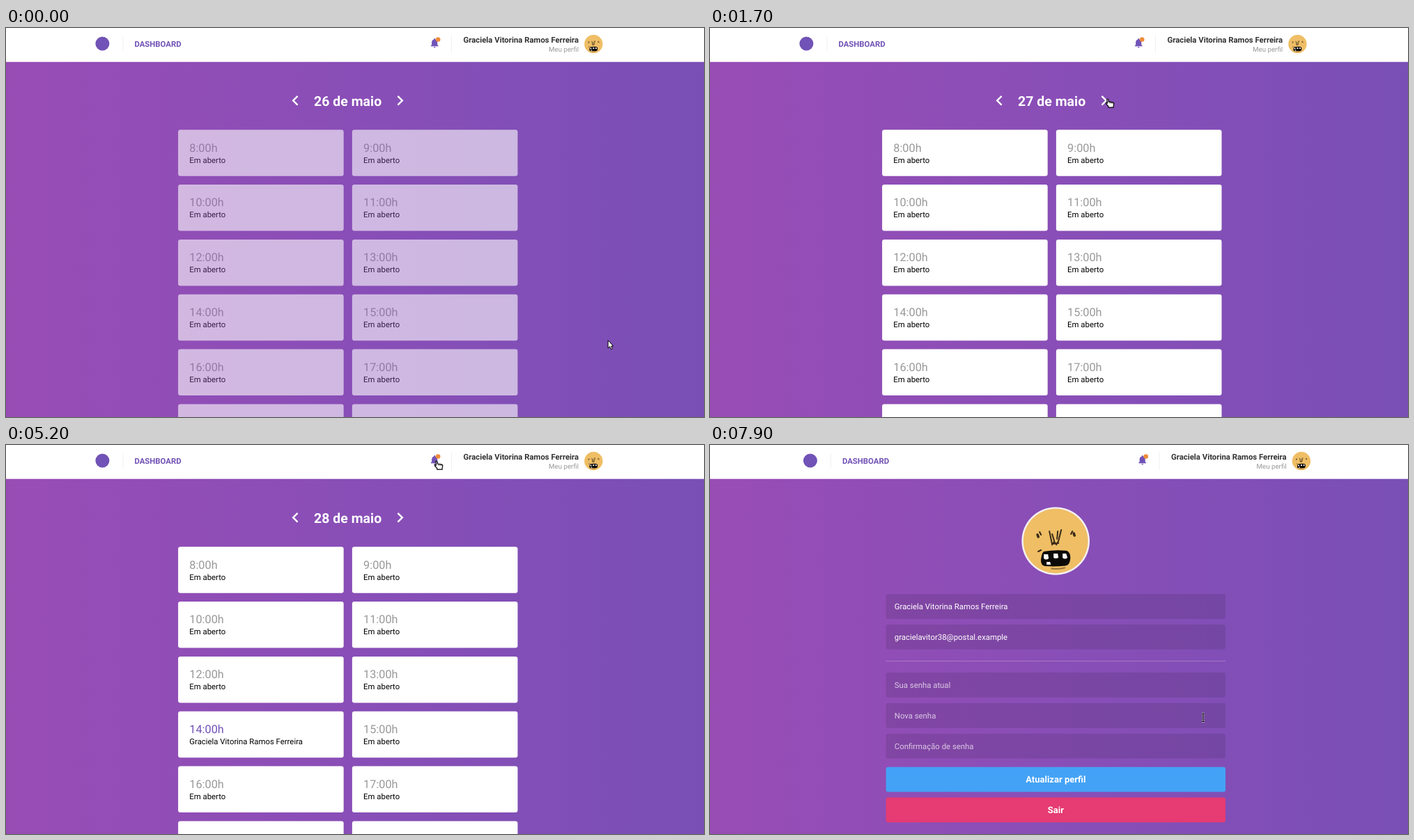
Recreate the animation shown at these times as an HTML page. Size 1002x559 px, loop 8000 ms.

```html
<!DOCTYPE html>
<html lang="pt-BR">
<head>
<meta charset="utf-8">
<title>Dashboard</title>
<style>
  html, body { margin: 0; width: 100%; height: 100%; overflow: hidden; }
  svg { display: block; width: 100%; height: 100%; }
  text { font-family: Roboto, Arial, sans-serif; text-rendering: geometricPrecision; white-space: pre; }
</style>
</head>
<body>
<svg id="stage" viewBox="0 0 1002 559"></svg>
<script>
const LOOP = 8000;
const STEP = 100;
const PX = 0.8125; // page zoom
const PURPLE = '#7152b6';
const NAME = 'Graciela Vitorina Ramos Ferreira';
const [FIRST, ...REST] = NAME.split(' ');

const text = (x, y, size, fill, str, extra = '') =>
  `<text x="${x}" y="${y}" font-size="${size * PX}" fill="${fill}" ${extra}>${str}</text>`;
const rect = (x, y, w, h, fill, r = 0, extra = '') =>
  `<rect x="${x}" y="${y}" width="${w}" height="${h}" rx="${r}" fill="${fill}" ${extra}/>`;
const circle = (x, y, r, fill) => `<circle cx="${x}" cy="${y}" r="${r}" fill="${fill}"/>`;
const icon = (x, y, size, fill, d) =>
  `<path transform="translate(${x} ${y}) scale(${size * PX / 24})" fill="${fill}" d="${d}"/>`;
const BOLD = 'font-weight="700"';
const END = 'text-anchor="end"';
const MIDDLE = 'text-anchor="middle"';

// Face centred on 0,0 with a radius of 46.4
function avatar(x, y, r) {
  return `<g transform="translate(${x} ${y}) scale(${r / 46.4})">
    ${circle(0, 0, 46.4, '#efbe65')}
    <g fill="none" stroke="#3a2b18" stroke-width="2" stroke-linecap="round">
      <path stroke-width="3.6" d="M-26 -9l1 3M26 -11l1 3"/>
      <path d="M-23 -13l2 4M24 -14l-2 4M-25 15l4 -2"/>
      <path d="M-9 -14l4 19 3 -4 3 4 3 -5 4 -16M-5 -10l3 10M3 -14l-1 11M-4 4l8 -1"/>
      <path stroke="#9a743c" d="M-6 39.5q9 1.500 19 -1"/>
    </g>
    <path fill="#0c0a08" d="M-17 15Q0 12 16 14Q22 17 21 26Q20 35 14 35.500Q0 37 -15 36Q-22 35 -21 26Q-20 17 -17 15Z"/>
    <path fill="#fff" d="M-17 19h6l1 6q-4 3 -7 0zM-3 18h6l1 6q-4 2 -7 0zM10 18h5l2 6q-4 3 -7 0zM-13 30l5 0 1 4h-6z"/>
  </g>`;
}

const BELL = 'M12 22c1.1 0 2-.9 2-2h-4c0 1.1.89 2 2 2zm6-6v-5c0-3.07-1.64-5.64-4.5-6.32V4c0-.83-.67-1.5-1.5-1.5s-1.5.67-1.5 1.5v.68C7.63 5.36 6 7.92 6 11v5l-2 2v1h16v-1l-2-2z';
const PREV = 'M15.41 7.41L14 6l-6 6 6 6 1.41-1.41L10.83 12z';
const NEXT = 'M10 6L8.59 7.41 13.17 12l-4.58 4.59L10 18l6-6z';

const header = () => `${rect(0, 0, 1002, 48.75, '#fff')}
  <g id="bar">
    ${circle(138.4, 22.5, 10, PURPLE)}
    ${rect(167.6, 12.5, 0.8, 20, '#eee')}
    ${text(184.4, 26.8, 14, PURPLE, 'DASHBOARD', BOLD)}
    ${icon(607.1, 13.4, 20, PURPLE, BELL)}
    ${circle(620.2, 16.5, 3.3, '#ee8a38')}
    ${rect(639.2, 10, 0.8, 26, '#eee')}
    ${text(822.2, 20.8, 14, '#333', NAME, BOLD + END)}
    ${text(822.2, 34.2, 12, '#999', 'Meu perfil', END)}
    ${avatar(843.4, 23, 13.2)}
  </g>`;

function slot(i) {
  const x = i % 2 ? 496.9 : 247.1;
  const y = 146.2 + Math.floor(i / 2) * 78.85;
  const hour = 8 + i;
  return rect(x, y, 237.6, 66.5, '#fff', 3.25) +
    text(x + 16.2, y + 31.3, 20, '#999', `${hour}:00h`, `id="time${hour}"`) +
    text(x + 16.2, y + 47.3, 14, '#000', 'Em aberto', `id="who${hour}"`);
}

const agenda = () => `<g id="agenda">
  ${icon(400.7, 89.6, 36, '#fff', PREV)}
  ${text(490.6, 112, 24, '#fff', '', `id="date" ${BOLD} ${MIDDLE}`)}
  ${icon(551.1, 89.6, 36, '#fff', NEXT)}
  <g id="slots">${Array.from({ length: 12 }, (_, i) => slot(i)).join('')}</g>
</g>`;

function notice(i) {
  const y = 83.4 + i * 95.7;
  const line = (dy, size, fill, str) => text(525.8, y + dy, size, fill, str);
  const opening = line(0, 13, '#fff', `Novo agendamento de ${FIRST}`);
  if (i === 2) return opening;
  return opening +
    line(14, 13, '#fff', `${REST.join(' ')} para dia 29`) +
    line(28, 13, '#fff', `de maio, às ${9 + i}:00h.`) +
    line(40.8, 12, 'rgba(255,255,255,.6)', 'há 19 minutos') +
    line(58, 12, '#b09ade', 'Marcar como lida') +
    circle(613.2, y + 54.6, 3.3, '#ff8450') +
    rect(525.8, y + 72.3, 178.5, 0.8, 'rgba(255,255,255,.12)');
}

const popup = () => `<g id="popup">
  <path fill="rgba(0,0,0,.6)" d="M598.8 56.800L615.1 40.600L631.300 56.800H717.300a3.25 3.25 0 0 1 3.25 3.25V289.100a3.25 3.25 0 0 1 -3.25 3.25H512.700a3.25 3.25 0 0 1 -3.25 -3.25V60.050a3.25 3.25 0 0 1 3.25 -3.25Z"/>
  ${[0, 1, 2].map(notice).join('')}
</g>`;

const field = (y, str, fill) =>
  rect(252.6, y, 487.4, 35.75, 'rgba(0,0,0,.1)', 3.25) + text(264.8, y + 22.1, 14, fill, str);
const button = (y, fill, str) =>
  rect(252.6, y, 487.4, 35.75, fill, 3.25) + text(496.3, y + 22.5, 16, '#fff', str, BOLD + MIDDLE);

function profile() {
  const hint = 'rgba(255,255,255,.7)';
  return `<g id="profile">
    ${circle(496.2, 138, 48.8, '#f4f1f5')}
    ${avatar(496.2, 138, 46.4)}
    ${field(214.3, NAME, '#fff')}
    ${field(258.1, 'gracielavitor38@postal.example', '#fff')}
    ${rect(252.6, 310, 487.4, 0.8, 'rgba(255,255,255,.3)')}
    ${field(327.1, 'Sua senha atual', hint)}
    ${field(371, 'Nova senha', hint)}
    ${field(414.8, 'Confirmação de senha', hint)}
    ${button(462.8, '#44a2f6', 'Atualizar perfil')}
    ${button(506.6, '#e63b73', 'Sair')}
  </g>`;
}

const cursors = {
  arrow: '<path fill="#fff" stroke="#000" stroke-linejoin="round" d="M.6.8V12L3.200 9.700L5 13.600L6.900 12.800L5.200 9H8.300Z"/>',
  hand: `<path fill="#fff" stroke="#000" stroke-width="1.2" stroke-linejoin="round"
    d="M2.200 1.800Q2.200.7 3.300.7T4.400 1.800V4.600L10.500 5.500Q12.300 5.800 12.300 7.400L11.600 10V12.800H4.200V11L1 7.600Q.5 6.200 1.700 6.100L2.800 7Z"/>
    <path fill="none" stroke="#000" stroke-width=".7" d="M6.500 5.200V7.200M8.500 5.500V7.400M10.400 5.800V7.600"/>`,
  beam: `<path fill="none" stroke="#fff" stroke-width="2.400" stroke-opacity=".7" d="M1 1H5M3 1V12.500M1 12.500H5"/>
    <path fill="none" stroke="#000" stroke-width="1.200" d="M1 1H5M3 1V12.500M1 12.500H5"/>`
};

const stage = document.getElementById('stage');
stage.innerHTML = `<defs><linearGradient id="bg">
    <stop stop-color="#984db5"/><stop offset=".5" stop-color="#894eb7"/><stop offset="1" stop-color="#794fb6"/>
  </linearGradient></defs>
  ${rect(0, 0, 1002, 559, 'url(#bg)')}
  ${header()}${agenda()}${popup()}${profile()}
  <g id="cursor">${Object.entries(cursors).map(([k, d]) => `<g id="${k}">${d}</g>`).join('')}</g>`;

const el = id => document.getElementById(id);
const show = (id, on) => el(id).setAttribute('display', on ? 'inline' : 'none');

// Pointer path: time, x, y, and the shape worn from then on
const path = [
  [0, 863.6, 448, 'arrow'], [200, 863.6, 448, 'arrow'], [800, 534, 108, 'arrow'],
  [900, 557, 106.5, 'hand'], [1200, 557, 106.5, 'hand'], [1300, 567.6, 101.3, 'hand'],
  [3000, 567.6, 101.3, 'hand'], [3200, 576, 88, 'arrow'], [3600, 613, 27, 'hand'],
  [3700, 614.6, 22.4, 'hand'], [5300, 614.6, 22.4, 'hand'], [5400, 615.4, 24.2, 'hand'],
  [5500, 615.4, 24.2, 'hand'], [5600, 634, 28, 'arrow'], [5900, 765, 36.5, 'arrow'],
  [6100, 797.6, 33, 'hand'], [7200, 797.6, 33, 'hand'], [7300, 801, 34.5, 'arrow'],
  [7400, 801, 34.5, 'arrow'], [7700, 730, 340, 'beam'], [7800, 706, 393.5, 'beam'],
  [7900, 705, 385, 'beam'], [LOOP, 705, 385, 'beam']
];

function pointer(t) {
  const i = path.findIndex((_, k) => t < path[k + 1][0]);
  const [t0, x0, y0, kind] = path[i];
  const [t1, x1, y1] = path[i + 1];
  const u = (t - t0) / (t1 - t0);
  const e = u * u * (3 - 2 * u);
  return { x: x0 + (x1 - x0) * e, y: y0 + (y1 - y0) * e, kind };
}

function draw(time) {
  const t = Math.floor((time % LOOP) / STEP) * STEP;
  const onProfile = t >= 6500;
  const booked = t >= 2700;

  show('agenda', !onProfile);
  show('profile', onProfile);
  show('popup', t >= 4000 && t < 5200);
  el('bar').setAttribute('transform', `translate(${onProfile ? 5.5 : 0} 0)`);

  el('date').textContent = `${t < 1600 ? 26 : booked ? 28 : 27} de maio`;
  el('slots').setAttribute('opacity', t < 1700 ? 0.6 : 1);
  el('time14').setAttribute('fill', booked ? PURPLE : '#999');
  el('who14').textContent = booked ? NAME : 'Em aberto';

  const p = pointer(t);
  el('cursor').setAttribute('transform', `translate(${p.x} ${p.y})`);
  for (const kind in cursors) show(kind, kind === p.kind);
}

const start = performance.now();
function tick() {
  draw(performance.now() - start);
  requestAnimationFrame(tick);
}
tick();
</script>
</body>
</html>
```
